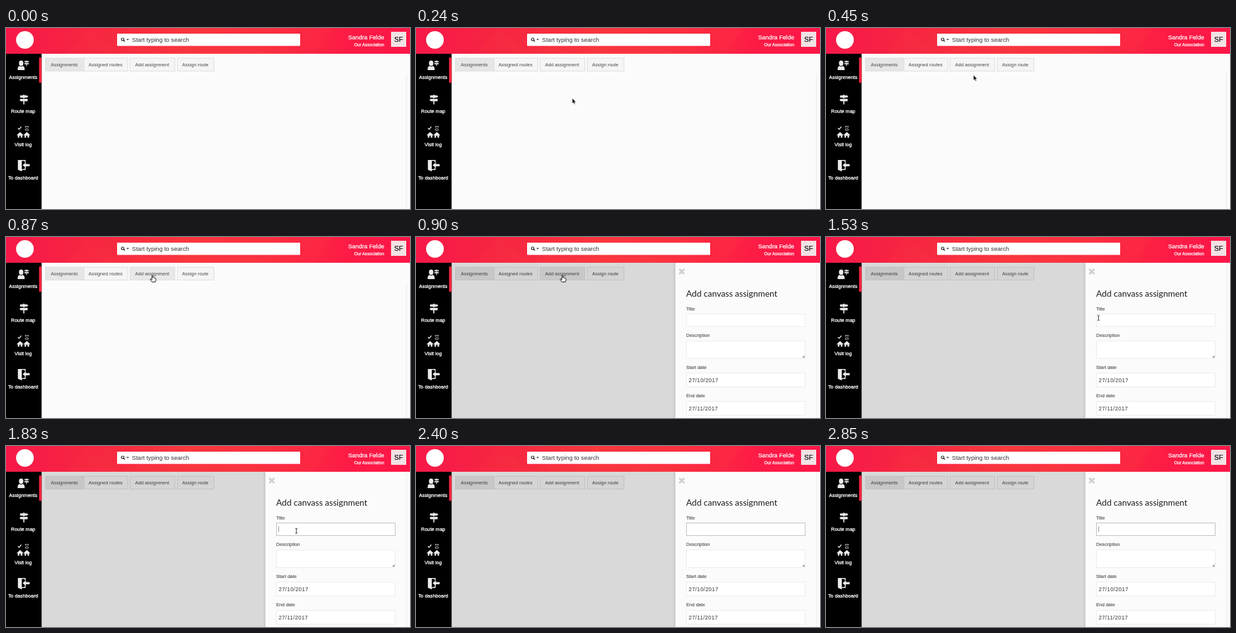
Recreate the animation shown at these times as an HTML page. Size 640 by 288 pixels, loop 2.88 s.

```html
<!DOCTYPE html>
<html lang="en">
<head>
<meta charset="utf-8">
<title>Add assignment</title>
<style>
html, body { margin: 0; width: 100%; height: 100%; overflow: hidden; background: #fbfbfb; }
svg { display: block; width: 100vw; height: 100vh; }
text { font: 7.5px "Liberation Sans", Arial, sans-serif; fill: #484848; }
.nav text { font-size: 7.85px; fill: #fff; stroke: #fff; stroke-width: .3; text-anchor: middle; }
.user text { fill: #fff; stroke: #fff; stroke-width: .25; text-anchor: end; }
.icon { fill: #eaeaea; }
.button rect { stroke: #dedede; }
.button text { text-anchor: middle; }
.field { fill: #fff; stroke: #ececec; }
.label { stroke: #484848; stroke-width: .1; }
.date { font-size: 8.5px; letter-spacing: .46px; fill: #333; }
</style>
</head>
<body>
<svg viewBox="0 0 640 288" preserveAspectRatio="none">
  <defs>
    <linearGradient id="red">
      <stop offset="0" stop-color="#f81849"/>
      <stop offset=".2" stop-color="#f62541"/>
      <stop offset=".45" stop-color="#fa363e"/>
      <stop offset=".65" stop-color="#fb3040"/>
      <stop offset=".85" stop-color="#fd1b45"/>
      <stop offset="1" stop-color="#fd1648"/>
    </linearGradient>
    <linearGradient id="edge">
      <stop offset="0" stop-opacity="0"/>
      <stop offset="1" stop-opacity=".07"/>
    </linearGradient>
    <path id="signpost" d="M-.9-8H.9V-6.8H5L7-5 5-3.2H.9V-2H-.9V-3.2H-6V-6.8H-.9ZM-5-1.2H6V2.4H.9V7.5H-.9V2.4H-5L-7 .6Z"/>
    <path id="house" d="M0-4.4 5.2.2 4.4 1 3.6.4V4.4H1.1V1.4H-1.1V4.4H-3.6V.4L-4.4 1-5.2.2Z"/>
  </defs>

  <rect width="640" height="288" fill="#fbfbfb"/>
  <rect x="633" y="73" width="3" height="215" fill="#f4f4f4"/>
  <g id="buttons"></g>

  <g id="panel">
    <rect x="56" y="41" width="355" height="247" fill="#000" opacity=".137"/>
    <rect x="406" y="41" width="5" height="247" fill="url(#edge)"/>
    <rect x="411" y="41" width="229" height="247" fill="#fbfbfb"/>
    <rect x="634" y="41" width="1.5" height="247" fill="#f1f1f1"/>
    <path d="M417 51 425 59M425 51 417 59" stroke="#cfcfcf" stroke-width="3"/>
    <text x="428" y="95" style="font:13.6px Lato,sans-serif;fill:#1c1c1c">Add canvass assignment</text>
    <g id="form"></g>
    <path d="M615.5 188V192H611.5Z" fill="#999"/>
    <path id="caret" d="M432 127.5V137" stroke="#777" stroke-width=".8"/>
  </g>

  <rect width="640" height="41" fill="url(#red)"/>
  <path d="M130 0 176 41H96ZM214 28 250 41H180ZM330 41 362 28 420 41ZM466 0 520 0 486 41Z" fill="#ff5a50" opacity=".07"/>
  <circle cx="30" cy="19" r="14" fill="#fff"/>
  <rect x="176" y="9" width="290" height="19.5" rx="1" fill="#fff"/>
  <circle cx="184.8" cy="18" r="2" fill="none" stroke="#222" stroke-width="1.2"/>
  <path d="M186.2 19.5 188.3 21.6" stroke="#222" stroke-width="1.4"/>
  <path d="M190.7 17.4H195L192.85 19.6Z" fill="#222"/>
  <text x="199.5" y="22.3" style="font-size:9.6px;fill:#333">Start typing to search</text>
  <g class="user">
    <text x="599" y="18" style="font-size:9.5px">Sandra Felde</text>
    <text x="599" y="29" style="font-size:6.8px">Our Association</text>
  </g>
  <rect x="610" y="6" width="24" height="24" fill="#f1e2e4"/>
  <text x="622" y="22" text-anchor="middle" style="font-size:11px;fill:#111;stroke:#111;stroke-width:.2">SF</text>

  <rect y="41" width="56.4" height="247" fill="#000"/>
  <rect x="52.4" y="47" width="4" height="40" fill="#f8243f"/>
  <g class="icon">
    <ellipse cx="24" cy="56" rx="3.5" ry="4.2"/>
    <path d="M18.5 67V64Q19 60.8 22 60.4L24 61.5 26 60.4Q29 60.8 29.5 64V67Z"/>
    <use href="#signpost" transform="translate(32.6 56.3) scale(.56)"/>
    <use href="#signpost" x="28.3" y="114"/>
    <use href="#house" x="22.3" y="170"/>
    <use href="#house" x="33" y="170"/>
    <path d="M19 159.3 20.8 161.3 24.3 157" fill="none" stroke="#eaeaea" stroke-width="1.3"/>
    <path d="M30.5 156.5H35.5V157.5L33.7 159.5 35.5 161.5V162.5H30.5V161.5L32.3 159.5 30.5 157.5Z" fill="none" stroke="#eaeaea" stroke-width=".8"/>
    <path d="M18.8 210H31V214H29.6V211.4H25V224.6H29.6V222H31V226H25V228.2L18.8 225.5ZM26.3 218.3 31.5 213.8V216.6H37.5V220H31.5V222.8Z"/>
  </g>
  <g class="nav" id="nav"></g>

  <g id="cursor" stroke-linejoin="round">
    <path id="arrow" d="M0 0V9L2 7.2 3.4 10.3 4.9 9.6 3.5 6.7H6.2Z" fill="#111" stroke="#fff" stroke-width=".7"/>
    <path id="hand" d="M-.9 1Q0-.3.9 1V4.2Q2 3.6 2.6 4.5 3.8 4 4.2 5 5.5 4.8 5.5 6V8L4.5 11H-.8L-3.4 7.2Q-3.6 5.8-2.3 6.2L-.9 7.4Z" fill="#fff" stroke="#111"/>
    <path id="beam" d="M-1.8-4Q-.3-4 0-3 .3-4 1.8-4M0-3V3M-1.8 4Q-.3 4 0 3 .3 4 1.8 4" fill="none" stroke="#222"/>
  </g>
</svg>
<script>
const LOOP = 2880, OPEN = 900, FOCUS = 1800, BLINK = 510, HIDE = 2280;
const $ = id => document.getElementById(id);
const show = (id, on) => $(id).setAttribute('visibility', on ? 'inherit' : 'hidden');

$('buttons').innerHTML = [
  ['Assignments', 62.5, 61], ['Assigned routes', 123.5, 69.5],
  ['Add assignment', 196.5, 71], ['Assign route', 271.5, 58]
].map(([label, x, w], i) => `<g class="button">
  <rect x="${x}" y="48" width="${w}" height="20.5" fill="${i ? '#f5f5f5' : '#e6e6e6'}"/>
  <text x="${x + w / 2 - .6}" y="61.4">${label}</text></g>`).join('');
const addButton = document.querySelectorAll('.button rect')[2];

$('form').innerHTML = [
  ['Title', 116.5, 122.5, 20], ['Description', 158.7, 165.5, 28],
  ['Start date', 210, 216.5, 22, '27/10/2017'], ['End date', 255.2, 261.5, 22, '27/11/2017']
].map(([label, base, y, h, value = '']) => `<text class="label" x="428" y="${base}">${label}</text>
  <rect class="field" x="428.5" y="${y}" width="188" height="${h}"/>
  <text class="date" x="432" y="${y + 14.3}">${value}</text>`).join('');
const titleField = document.querySelector('.field');

$('nav').innerHTML = ['Assignments', 'Route map', 'Visit log', 'To dashboard']
  .map((label, i) => `<text x="27.2" y="${81.3 + i * 53.2}">${label}</text>`).join('');

const out = p => 1 - (1 - p) ** 2;
const speedUp = p => p ** 1.4;
// Pointer stops: time, x, y, easing towards the stop
const stops = [
  [150, 262, 150], [450, 233.5, 74.5, out], [600, 232, 60.6, out],
  [1020, 232, 60.6, out], [1320, 360.5, 113, speedUp], [1770, 460, 135, out]
];

function pointer(t) {
  const i = stops.findIndex(s => s[0] > t);
  if (i === 0) return stops[0].slice(1, 3);
  if (i < 0) return stops.at(-1).slice(1, 3);
  const [t0, x0, y0] = stops[i - 1], [t1, x1, y1, ease] = stops[i];
  const p = ease((t - t0) / (t1 - t0));
  return [x0 + (x1 - x0) * p, y0 + (y1 - y0) * p];
}

function render(time) {
  const t = Math.floor((time % LOOP) / 30) * 30;
  const [x, y] = pointer(t);
  const open = t >= OPEN, focused = t >= FOCUS;
  const overButton = y < 69 && x > 196 && x < 267;
  const overTitle = open && x > 428 && y > 122;

  show('panel', open);
  addButton.setAttribute('fill', overButton ? '#e8e8e8' : '#f5f5f5');
  titleField.style.stroke = focused ? '#c0c0c0' : '';
  show('caret', focused && Math.floor((t - FOCUS) / BLINK) % 2 === 0);

  show('cursor', t >= stops[0][0] && t < HIDE);
  $('cursor').setAttribute('transform', `translate(${x} ${y})`);
  show('hand', overButton);
  show('beam', overTitle);
  show('arrow', !overButton && !overTitle);
}

const start = performance.now();
function tick() {
  render(performance.now() - start);
  requestAnimationFrame(tick);
}
tick();
</script>
</body>
</html>
```
